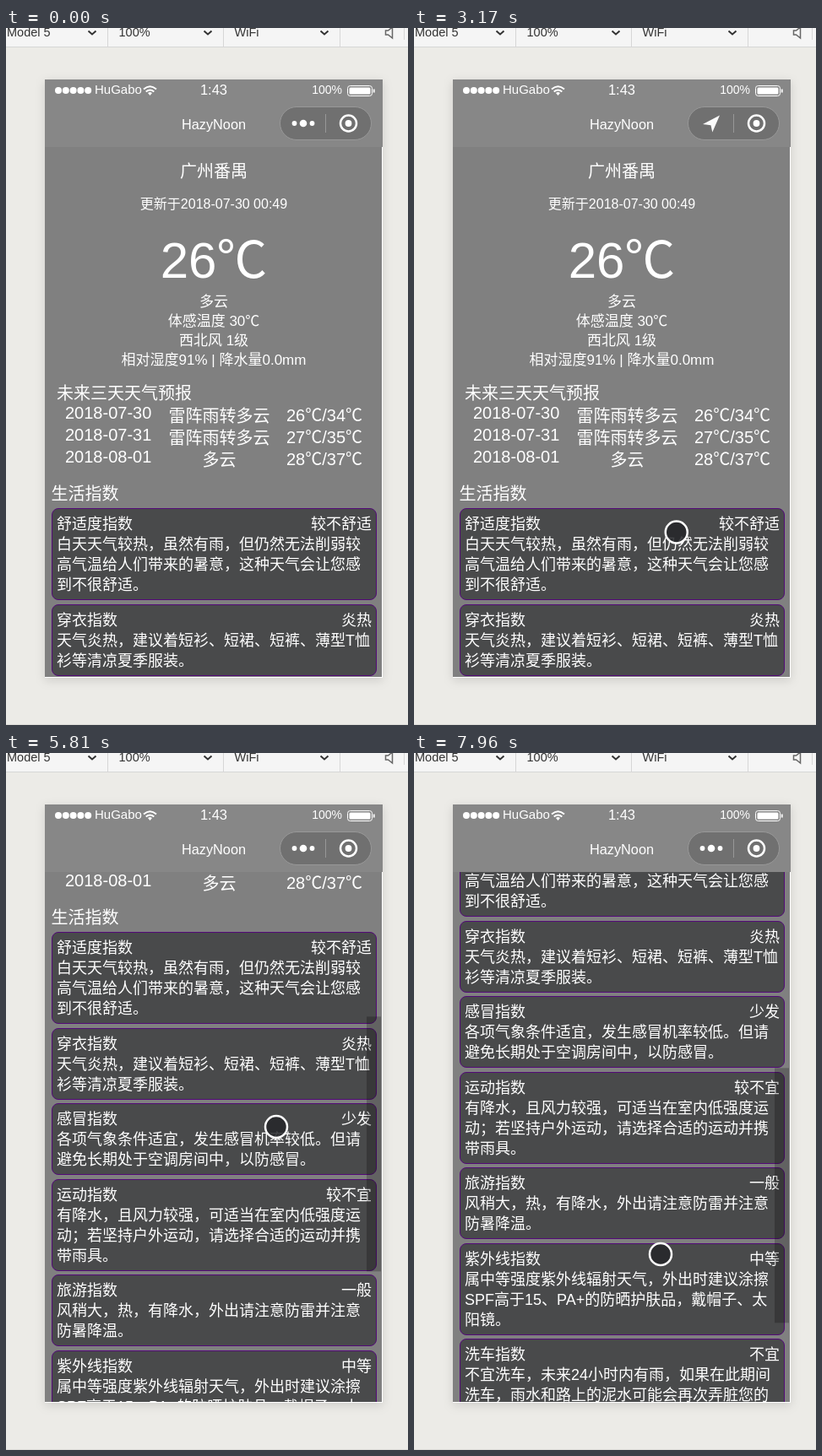
Recreate the animation shown at these times as an HTML page. Size 476 by 826 pixels, loop 8 s.

```html
<!DOCTYPE html>
<html lang="zh-CN">
<head>
<meta charset="utf-8">
<title>Weather page</title>
<style>
html, body { margin: 0; width: 100%; height: 100%; overflow: hidden; background: #ecebe7; }
svg { display: block; width: 476px; height: 826px; }
text {
  font-family: 'Liberation Sans', 'Noto Sans CJK SC', 'Noto Sans CJK', sans-serif;
  fill: #fff; white-space: pre; text-spacing-trim: space-all;
}
.bar text { fill: #333; font-size: 14.5px; }
#phone { filter: drop-shadow(0 3px 6px rgba(0,0,0,.13)); }
</style>
</head>
<body>
<svg viewBox="0 0 476 826" xmlns="http://www.w3.org/2000/svg">
  <defs>
    <clipPath id="view"><rect x="46" y="141" width="399" height="628"/></clipPath>
  </defs>
  <rect width="476" height="826" fill="#ecebe7"/>
  <g class="bar">
    <rect width="476" height="22" fill="#f5f5f5"/>
    <path d="M0 22.5H476M120.5 0V22M257.5 0V22M395.5 0V22M471.5 0V14" stroke="#d6d6d6" fill="none"/>
    <text x="1" y="10">Model 5</text>
    <text x="133.500" y="10">100%</text>
    <text x="270.500" y="10">WiFi</text>
    <path d="M97.500 3.500l4.500 4 4.500-4M234.500 3.500l4.500 4 4.500-4M372.500 3.500l4.500 4 4.500-4" fill="none" stroke="#333" stroke-width="2"/>
    <path d="M449.500 3h3l5-4v13l-5-4h-3z" fill="none" stroke="#666" stroke-width="1.500"/>
  </g>
  <path d="M0 825.500H476" stroke="#dddcd8"/>
  <rect id="phone" x="46" y="61" width="400" height="709" fill="#fff"/>
  <g clip-path="url(#view)">
    <g id="page"></g>
    <rect id="thumb" x="427" width="17" height="302" fill="#000" fill-opacity=".24"/>
  </g>
  <rect x="46" y="61" width="400" height="80" fill="#878787"/>
  <g id="head"></g>
  <g id="dots" fill="#fff">
    <circle cx="341.500" cy="113" r="2.900"/><circle cx="352" cy="113" r="4.300"/><circle cx="362.500" cy="113" r="2.900"/>
  </g>
  <path id="arrow" d="M362 103.500L342 114l9.500 1.200 1.800 8.300z" fill="#fff"/>
  <circle id="touch" r="13" fill="#25272a" fill-opacity=".86" stroke="#fff" stroke-width="2.500"/>
</svg>
<script>
const el = id => document.getElementById(id);
const label = (s, x, y, size, anchor = 'start') =>
  `<text x="${x}" y="${y}" font-size="${size}" text-anchor="${anchor}">${s}</text>`;
const mid = (s, y, size) => label(s, 246, y, size, 'middle');

const forecast = [
  ['2018-07-30', '雷阵雨转多云', '26℃/34℃'],
  ['2018-07-31', '雷阵雨转多云', '27℃/35℃'],
  ['2018-08-01', '多云', '28℃/37℃'],
];
const tips = [
  ['舒适度指数', '较不舒适', '白天天气较热，虽然有雨，但仍然无法削弱较', '高气温给人们带来的暑意，这种天气会让您感', '到不很舒适。'],
  ['穿衣指数', '炎热', '天气炎热，建议着短衫、短裙、短裤、薄型T恤', '衫等清凉夏季服装。'],
  ['感冒指数', '少发', '各项气象条件适宜，发生感冒机率较低。但请', '避免长期处于空调房间中，以防感冒。'],
  ['运动指数', '较不宜', '有降水，且风力较强，可适当在室内低强度运', '动；若坚持户外运动，请选择合适的运动并携', '带雨具。'],
  ['旅游指数', '一般', '风稍大，热，有降水，外出请注意防雷并注意', '防暑降温。'],
  ['紫外线指数', '中等', '属中等强度紫外线辐射天气，外出时建议涂擦', 'SPF高于15、PA+的防晒护肤品，戴帽子、太', '阳镜。'],
  ['洗车指数', '不宜', '不宜洗车，未来24小时内有雨，如果在此期间', '洗车，雨水和路上的泥水可能会再次弄脏您的', '爱车。'],
];

function buildPage() {
  let out = '<rect x="46" y="141" width="399" height="1310" fill="#808080"/>' +
    mid('广州番禺', 177, 20) +
    mid('更新于2018-07-30 00:49', 214, 16) +
    mid('26℃', 296, 60) +
    mid('多云', 330, 17) +
    mid('体感温度 30℃', 353, 17) +
    mid('西北风 1级', 376, 17) +
    mid('相对湿度91% | 降水量0.0mm', 399, 17) +
    label('未来三天天气预报', 60, 440, 20);
  forecast.forEach(([day, sky, temp], i) => {
    const y = 463 + 26 * i;
    out += label(day, 70, y, 20) + label(sky, 252.5, y + 3.5, 20, 'middle') + label(temp, 332, y + 3, 20);
  });
  out += label('生活指数', 53.5, 559, 20);
  let top = 569.3;
  for (const [name, level, ...lines] of tips) {
    const y = Math.round(top), step = 23.9 * lines.length + 41.7;
    out += `<rect x="54.5" y="${y + .5}" width="384" height="${Math.round(step - 5.4)}" rx="7.5" fill="#494a4b" stroke="#530a78"/>` +
      label(name, 60, y + 25, 18) + label(level, 433, y + 25, 18, 'end');
    lines.forEach((s, i) => out += label(s, 60, y + 49 + 24 * i, 18));
    top += step;
  }
  return out;
}

function buildHead() {
  let out = '';
  for (let i = 0; i < 5; i++) out += `<circle cx="${62 + 8.8 * i}" cy="74" r="4" fill="#fff"/>`;
  return out + label('HuGabo', 105, 78, 15) + mid('1:43', 79, 16.5) +
    label('100%', 398, 78, 14, 'end') + mid('HazyNoon', 120, 16.3) +
    `<g fill="none" stroke="#fff" stroke-width="2">
      <path d="M163 72.500q7.500-6.500 15 0M165.700 75.500q4.800-4 9.600 0"/>
      <path d="M168 77q2.500-1.800 5 0l-2.500 3z" fill="#fff" stroke="none"/>
      <rect x="404.500" y="68.500" width="29" height="12" rx="3" stroke-width="1"/>
      <rect x="406.500" y="70.500" width="25" height="8" rx="1.500" fill="#fff" stroke="none"/>
      <path d="M435.700 72.500v4" stroke-width="1.800"/>
      <rect x="324.500" y="93.500" width="108" height="39" rx="19.500" fill="#707070" stroke="#989898" stroke-width="1"/>
      <path d="M378.500 102v22" stroke="#989898" stroke-width="1"/>
      <circle cx="405.500" cy="113" r="9.500" stroke-width="2.500"/>
      <circle cx="405.500" cy="113" r="3.900" fill="#fff" stroke="none"/>
    </g>`;
}

// Screen refreshes: start, end, number of steps
const bursts = [
  [540, 600, 2], [750, 1460, 10], [1850, 2630, 11], [2710, 3470, 11], [3550, 3700, 3], [3870, 4640, 11],
  [4710, 5500, 11], [5580, 6350, 11], [6430, 6490, 2], [6720, 7430, 10], [7590, 7960, 6],
];
function snap(t) {
  let shown = 0;
  for (const [a, b, n] of bursts) {
    if (t < a) break;
    const gap = (b - a) / (n - 1);
    shown = a + gap * Math.min(n - 1, Math.floor((t - a) / gap + .3));
  }
  return shown;
}

// Time, pointer x, pointer y, page offset
const keys = [
  [540, 407, 744, 0], [600, 399, 735, 0], [750, 399, 735, 0], [1460, 249, 300, 0], [1850, 249, 300, 0],
  [2318, 269, 512, 125], [2630, 284, 563, 152], [2786, 291, 576, 156], [3090, 307, 594, 0],
  [3470, 322, 607, 0], [3550, 322, 606, 0], [3700, 322, 598, 0], [3870, 322, 598, 0],
  [4332, 322, 549, -47], [4868, 322, 409, -191], [5500, 322, 260, -340], [5580, 322, 243, -357],
  [5811, 320, 443, -357], [6196, 313, 640, -357], [6350, 312, 651, -357], [6430, 312, 648, -357],
  [6490, 312, 644, -357], [6720, 312, 644, -357], [7114, 302, 587, -414], [7430, 300, 524, -477],
  [7590, 300, 522, -479], [7664, 299, 517, -484], [7960, 292, 594, -484],
];
const rate = (i, c) => (keys[i + 1][c] - keys[i][c]) / (keys[i + 1][0] - keys[i][0]);
function tangent(i, c) {
  if (i === 0 || i === keys.length - 1) return 0;
  const a = rate(i - 1, c), b = rate(i, c);
  return a * b > 0 ? 2 * a * b / (a + b) : 0;
}
// Monotone cubic through the keys
function track(t, c) {
  if (t <= keys[0][0]) return keys[0][c];
  const i = keys.findIndex((k, n) => n === keys.length - 2 || t < keys[n + 1][0]);
  const h = keys[i + 1][0] - keys[i][0];
  const u = Math.min(1, (t - keys[i][0]) / h), v = 1 - u;
  return keys[i][c] * v * v * (1 + 2 * u) + keys[i + 1][c] * u * u * (3 - 2 * u) +
    h * u * v * (tangent(i, c) * v - tangent(i + 1, c) * u);
}

function thumbAlpha(t) {
  if (t < 3900 || (t > 6270 && t < 6780)) return 0;
  return t > 5920 && t < 6270 ? (6270 - t) / 350 : 1;
}

function draw(time) {
  const t = snap(time), offset = Math.round(track(t, 3));
  el('page').setAttribute('transform', `translate(0 ${offset})`);
  el('thumb').setAttribute('y', 141 - .48 * Math.min(0, offset));
  el('thumb').setAttribute('opacity', thumbAlpha(t));
  const locating = t > 3000 && t < 5700;
  const pulse = .65 + .35 * Math.cos((t - 4330) / 1090 * 2 * Math.PI);
  el('dots').setAttribute('opacity', locating ? 0 : 1);
  el('arrow').setAttribute('opacity', locating ? pulse : 0);
  el('touch').setAttribute('opacity', time < 540 ? 0 : 1);
  el('touch').setAttribute('transform', `translate(${track(t, 1)} ${track(t, 2)})`);
}

el('page').innerHTML = buildPage();
el('head').innerHTML = buildHead();
const start = performance.now();
function tick() {
  draw((performance.now() - start) % 8000);
  requestAnimationFrame(tick);
}
tick();
</script>
</body>
</html>
```
